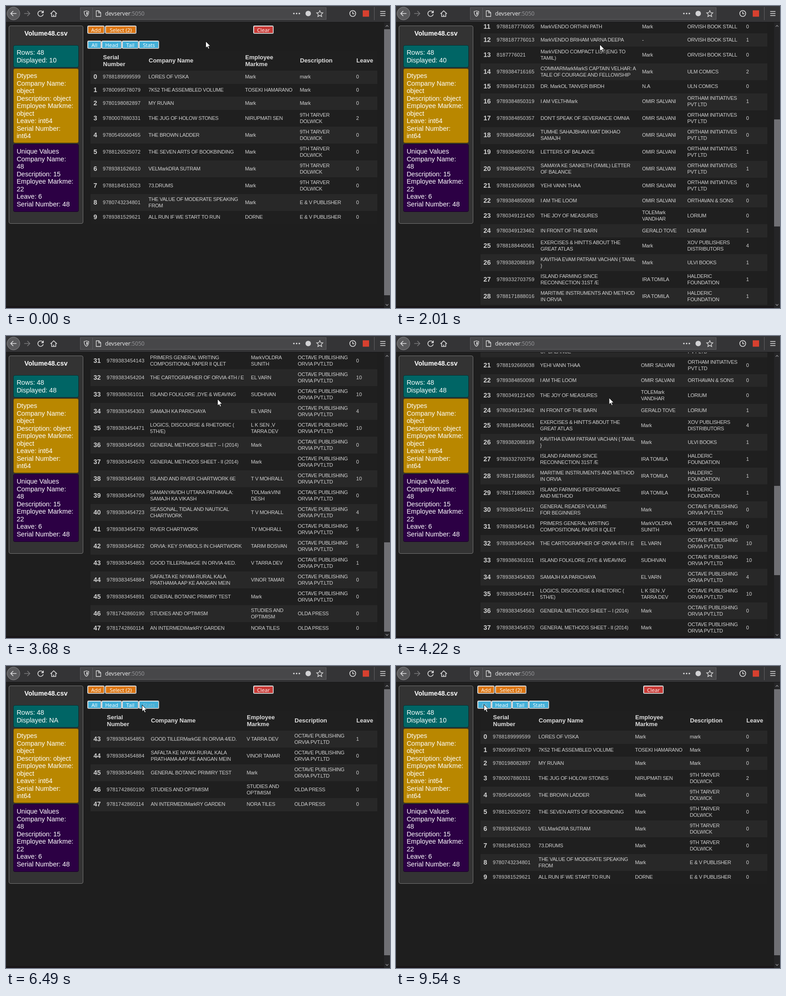
Write an HTML page that moves like this. It is 845 px wide and 663 px high and loops after 9.59 s.

```html
<!DOCTYPE html>
<html lang="en">
<head>
<meta charset="utf-8">
<title>Table viewer</title>
<style>
html, body { margin: 0; width: 100%; height: 100%; overflow: hidden; background: #1e1e1e; }
body { position: relative; color: #d2d2d2; font-family: "Liberation Sans", Arial, sans-serif; }
div, svg, button { position: absolute; box-sizing: border-box; }
#page { left: 0; top: 36px; width: 832px; height: 623px; overflow: hidden; }
#scroll { left: 0; top: -36px; width: 832px; height: 2000px; }
#foot { left: 0; top: 659px; width: 845px; height: 4px; background: #191518; }
.row { left: 186px; width: 631px; background: #1f1f1f; }
.row.even { background: #282828; }
.cell { top: 0; bottom: 0; display: flex; align-items: center; white-space: pre;
  font-size: 11.2px; line-height: 13.7px; letter-spacing: -.3px; }
.cell.num { letter-spacing: .16px; }
.cell.key { font-size: 14.4px; font-weight: bold; letter-spacing: 0; }
.cell.head { font-size: 13px; line-height: 14.4px; font-weight: bold; letter-spacing: 0; color: #dedede; }
button { margin: 0; padding: 0; height: 18px; border: 2px solid; border-radius: 3px;
  border-color: #e2e2e2 #c4c4c4 #c4c4c4 #e2e2e2; color: #fff; text-align: center;
  font: 11.6px/13px "Open Sans", "Noto Sans", sans-serif; white-space: nowrap; }
.dim { color: #8fbfd2; }
#caret { left: 286px; top: 44px; width: 1px; height: 15px; background: #ddd; }
#side { left: 6px; top: 43px; width: 164px; height: 435px; background: #333; border: 1px solid #777; border-radius: 4px; }
#name { left: 0; right: 0; top: 8px; text-align: center; font: bold 14.4px/17px "Liberation Sans", Arial, sans-serif; color: #fff; }
.box { left: 9px; width: 144px; padding: 7px 0 0 6.4px; border-radius: 4px; border: 1px solid #0007;
  color: #fff; font-size: 14.5px; line-height: 16.5px; white-space: pre; }
#bar { left: 832px; top: 36px; width: 13px; height: 627px; background: #252527; }
#thumb { left: 0; width: 13px; background: #707074; }
#url { left: 218px; top: 8px; font: 12.2px/18px "Open Sans", "Noto Sans", sans-serif; color: #f2f2f3; }
#url span { color: #99999c; }
</style>
</head>
<body>
<div id="page"><div id="scroll"><div id="caret"></div></div></div>
<div id="foot"></div>
<div id="side"><div id="name">Volume48.csv</div></div>
<div id="bar">
  <svg width="13" height="627" fill="none" stroke="#8c8c90" stroke-width="1.3"><path d="M3.5 9.5l3-3 3 3M3.5 618.5l3 3 3-3"/></svg>
  <div id="thumb"></div>
</div>
<svg width="845" height="36" fill="none" stroke="#dededf" stroke-width="1.6">
  <g stroke="none">
    <path fill="#343436" d="M0 0h845v36H0z"/>
    <path fill="#161618" d="M0 35h845v1H0z"/>
  </g>
  <rect x="163.500" y="3.500" width="541" height="26" fill="#474749" stroke="#626265" stroke-width="1"/>
  <circle cx="16.500" cy="16.500" r="14" fill="#5a5a5c" stroke="#8c8c8e" stroke-width="1"/>
  <path d="M23 16.500H10.500M16 11l-5.500 5.500L16 22"/>
  <path stroke="#77777a" d="M40 16.500h12.500M47 11l5.500 5.500L47 22"/>
  <path d="M81 13.200A6 6 0 1 0 82 18"/>
  <path fill="#dededf" stroke="none" d="M83 9.500v6h-6z"/>
  <path d="M98 17.200l7-6.700 7 6.700M100.500 16v7h9v-7M105 23v-4"/>
  <path stroke-width="1.300" d="M177 10.500c2 1 3.500 1.300 5 1.400 0 6-1.500 9-5 10.800-3.500-1.800-5-4.800-5-10.800 1.500-.1 3-.4 5-1.400z"/>
  <path fill="#dededf" stroke="none" d="M177 13c1 .5 2 .8 3 .9 0 3-1 5-3 6.400z"/>
  <path stroke="#626265" stroke-width="1" d="M190.500 4v25M810.500 2v29"/>
  <path stroke-width="1.300" d="M198.500 10.500h6l4 4v8.500h-10zM204 10.500v4.500h4.500"/>
  <g fill="#d2d2d4" stroke="none">
    <circle cx="633.500" cy="16.500" r="1.700"/><circle cx="639.500" cy="16.500" r="1.700"/><circle cx="645.500" cy="16.500" r="1.700"/>
    <circle cx="665" cy="16.500" r="6"/>
    <path fill="#d8402f" d="M785 9.500h14v14h-14z"/>
  </g>
  <path stroke-width="1.300" d="M690.500 10l2 4.500 4.900.5-3.600 3.300 1 4.800-4.300-2.500-4.300 2.500 1-4.800-3.600-3.300 4.900-.5z"/>
  <circle cx="763" cy="16.500" r="6.500"/>
  <path d="M763 12.500v4.500h3.500M823.500 12h11.500M823.500 16.500h11.500M823.500 21h11.500"/>
</svg>
<div id="url">devserver<span>:5050</span></div>
<svg id="cursor" width="13" height="20" style="left:0;top:0"><path d="M.5.5v14.500l3.400-3 2.300 5.200 2.400-1-2.300-5.100h4.500z" fill="#fff" stroke="#111"/></svg>
<script>
const LOOP = 9590;
const $ = id => document.getElementById(id);

// serial; title; employee; description (blank repeats the one above); leave
// Break marks: | always, ~ + ^ depend on the column widths of the view
const rows = `9788189999599;LORES OF VISKA;Mark;mark;0
9780099578079;7K52 THE ASSEMBLED VOLUME;TOSEKI^HAMARANO;Mark;0
9780198082897;MY RUVAN;Mark;Mark;0
9780007880331;THE JUG OF HOLOW STONES;NIRUPMATI+SEN;9TH TARVER|DOLWICK;2
9780545060455;THE BROWN LADDER;Mark;;0
9788126525072;THE SEVEN ARTS OF BOOKBINDING;Mark;;0
9789381626610;VELMarkDRA SUTRAM;Mark;;0
9788184513523;73.DRUMS;Mark;;0
9780743234801;THE VALUE OF MODERATE SPEAKING~FROM;Mark;E & V PUBLISHER;0
9789381529621;ALL RUN IF WE START TO RUN;DORNE;;0
9788183223966;BELNAR SE TOVAR TAK (QRD);Mark;;0
9788187776005;MarkVENDO ORTHIN PATH;Mark;ORVISH BOOK+STALL;0
9788187776013;MarkVENDO BRIHAM VARNA DEEPA;-;;1
8187776021;MarkVENDO COMPACT LIST(ENG TO~TAMIL);Mark;;0
9789384716165;COMMARMarkMarkS CAPTAIN VELHAR: A|TALE OF COURAGE AND FELLOWSHIP;Mark;ULM COMICS;2
9789384716233;DR. MarkOL TANVER BIRDH;N.A;ULN COMICS;0
9789384850319;I AM VELTHMark;OMIR SALVANI;ORTHAM+INITIATIVES~PVT+LTD;1
9789384850357;DON'T SPEAK OF SEVERANCE OMNIA;OMIR SALVANI;;0
9789384850364;TUMHE SAHAJBHAVI MAT DIKHAO~SAMAJH;OMIR SALVANI;;0
9789384850746;LETTERS OF BALANCE;OMIR SALVANI;;1
9789384850753;SAMAYA KE SANKETH (TAMIL) LETTER|OF BALANCE;OMIR SALVANI;;1
9788192669038;YEHI VANN THAA;OMIR SALVANI;;0
9789384850098;I AM THE LOOM;OMIR SALVANI;ORTHAVAN & SONS;0
9780349121420;THE JOY OF MEASURES;TOLEMark|VANDHAR;LORIUM;0
9780349123462;IN FRONT OF THE BARN;GERALD TOVE;;1
9788188440061;EXERCISES & HINTTS ABOUT THE|GREAT ATLAS;Mark;XOV PUBLISHERS|DISTRIBUTORS;4
9789382088189;KAVITHA EVAM PATRAM VACHAN { TAMIL|};Mark;ULVI BOOKS;1
9789332703759;ISLAND FARMING SINCE|RECONNECTION 31ST /E;IRA TOMILA;HALDERIC|FOUNDATION;1
9788171888016;MARITIME INSTRUMENTS AND METHOD|IN ORVIA;IRA TOMILA;;1
9788171888023;ISLAND FARMING PERFORMANCE|AND METHOD;IRA TOMILA;;1
9789383454112;GENERAL READER VOLUME|FOR BEGINNERS;Mark;OCTAVE PUBLISHING|ORVIA PVT.LTD;0
9789383454143;PRIMERS GENERAL WRITING|COMPOSITIONAL PAPER II QLET;MarkVOLDRA|SUNITH;;0
9789383454204;THE CARTOGRAPHER OF ORVIA 4TH / E;EL VARN;;10
9789386361011;ISLAND FOLKLORE ,DYE & WEAVING;SUDHIVAN;;10
9789383454303;SAMAJH KA PARICHAYA;EL VARN;;4
9789383454471;LOGICS, DISCOURSE & RHETORIC (|5TH/E);L K SEN ,V|TARRA DEV;;10
9789383454563;GENERAL METHODS SHEET -- I (2014);Mark;;0
9789383454570;GENERAL METHODS SHEET - II (2014);Mark;;0
9789383454693;ISLAND AND RIVER CHARTWORK 6E;T V MOHRALL;;10
9789383454709;SAMANYAVIDH UTTARA PATHMALA:|SAMAJH KA VIKASH;TOLMarkVINI|DESH;;0
9789383454723;SEASONAL, TIDAL AND NAUTICAL|CHARTWORK;T V MOHRALL;;4
9789383454730;RIVER CHARTWORK;TV MOHRALL;;5
9789383454822;ORVIA: KEY SYMBOLS IN CHARTWORK;TARIM BOSVAN;;5
9789383454853;GOOD TILLERMarkGE IN ORVIA 4/ED.;V TARRA DEV;;1
9789383454884;SAFALTA KE NIYAM-RURAL KALA|PRATHAMA AAP KE AANGAN MEIN;VINOR TAMAR;;0
9789383454891;GENERAL BOTANIC PRIMIRY TEST;Mark;;0
9781742860190;STUDIES AND OPTIMISM;STUDIES AND|OPTIMISM;OLDA PRESS;0
9781742860114;AN INTERMEDIMarkRY GARDEN;NORA TILES;;0`.split('\n').map((line, i) => [i, ...line.split(';')]);
rows.forEach((r, i) => { r[4] = r[4] || rows[i - 1][4]; });

const stats = `count;48;48
mean;9574862471318;1.58
std;1152906841533;2.93
min;8187776021;0
25%;9788171888016;0
50%;9789383454124;0
75%;9789384716182;1
max;9789386361011;10`.split('\n').map(line => line.split(';'));

const heads = ['', 'Serial|Number', 'Company Name', 'Employee|Markme', 'Description', 'Leave'];
const narrow = [193, 213.5, 314, 526.5, 647, 771];
const mid = [193, 222, 318.5, 542, 641.5, 771];
const views = {
  ten: { xs: narrow, data: rows.slice(0, 10), marks: '|~', max: 14, label: '10' },
  twenty: { xs: [193, 222, 318.5, 552, 649, 771], data: rows.slice(0, 20), marks: '|+^', max: 227, label: '20' },
  thirty: { xs: mid, data: rows.slice(0, 30), marks: '|~^', max: 484, label: '30' },
  forty: { xs: mid, data: rows.slice(0, 40), marks: '|~^', max: 889, label: '40' },
  full: { xs: [193, 222, 317.5, 539.5, 642.5, 771], data: rows, marks: '|~^', max: 1178, label: '48' },
  head: { xs: narrow, data: rows.slice(0, 5), marks: '|~', max: 14, label: 'NA' },
  tail: { xs: [193, 222, 319, 530, 635, 771], data: rows.slice(43), marks: '|~^', max: 14, label: 'NA' },
  stats: { xs: [193, 320, 620], data: stats, heads: ['', 'Serial Number', 'Leave'], marks: '|', max: 14, label: 'NA' }
};

function add(parent, cls, text = '', css = {}, tag = 'div') {
  const el = document.createElement(tag);
  el.className = cls;
  el.textContent = text;
  Object.assign(el.style, css);
  return parent.appendChild(el);
}
const px = n => n + 'px';

function addRow(parent, cells, view, y, h, cls) {
  const row = add(parent, cls, '', { top: px(y), height: px(h) });
  cells.forEach((text, i) => {
    const isHead = cls === 'row';
    const kind = isHead ? 'head' : i === 0 ? 'key' : /^[\d.]+$/.test(text) ? 'num' : '';
    add(row, 'cell ' + kind, text, { left: px(view.xs[i] - 186.4 + (isHead ? .4 : 0)) });
  });
}

function build(view) {
  const el = add($('scroll'), 'view');
  const wrap = cells => cells.map(c => String(c).replace(/[|~+^]/g, m => view.marks.includes(m) ? '\n' : ' '));
  const lines = cells => Math.max(...cells.map(c => c.split('\n').length));
  const title = wrap(view.heads || heads);
  let y = 99, h = lines(title) > 1 ? 43 : 28.5;
  addRow(el, title, view, y, h, 'row');
  view.data.forEach((r, i) => {
    y += h;
    const cells = wrap(r);
    h = [28.67, 37, 50.6][lines(cells) - 1];
    addRow(el, cells, view, y, h, i % 2 ? 'row odd' : 'row even');
  });
  view.el = el;
}
Object.values(views).forEach(build);

const buttons = {};
[['Add', 179, 38, 43, '#dc7612'], ['Select (2)', 218, 69, 43, '#dc7612'], ['Clear', 544, 45, 43, '#c93a36'],
 ['All', 179, 31, 76, '#42b0d9'], ['Head', 210, 45, 76, '#42b0d9'], ['Tail', 255, 37, 76, '#42b0d9'],
 ['Stats', 292, 45, 76, '#42b0d9']].forEach(([text, x, w, y, bg]) => {
  buttons[text] = add($('scroll'), '', text, { left: px(x), top: px(y), width: px(w), background: bg }, 'button');
});
$('scroll').append($('caret'));

const addBox = (y, h, bg, text) => add($('side'), 'box', text, { top: px(y), height: px(h), background: bg });
const info = addBox(42, 49, '#006565', '');
addBox(93, 164, '#b98700', 'Dtypes\nCompany Name:\nobject\nDescription: object\nEmployee Markme:\nobject\nLeave: int64\nSerial Number:\nint64');
addBox(259, 149, '#2c0044', 'Unique Values\nCompany Name:\n48\nDescription: 15\nEmployee Markme:\n22\nLeave: 6\nSerial Number: 48');

const shown = [[0, 'ten'], [560, 'twenty'], [1060, 'thirty'], [1600, 'forty'], [2310, 'full'],
  [5450, 'head'], [6320, 'tail'], [6590, 'stats'], [7960, 'ten']];
const scrolls = [[400, 0], [520, 14], [560, 14], [940, 227], [1220, 227], [1590, 484], [2020, 484], [2300, 889],
  [2550, 889], [2900, 1178], [3980, 1178], [4632, 0]];
const moves = [[400, 439, 77], [900, 446, 83], [1220, 446, 83], [1600, 448, 84], [2550, 448, 84], [2930, 455, 121],
  [3260, 455, 121], [3680, 465, 138], [3810, 468, 141], [3980, 468, 141], [4500, 469, 128], [4650, 469, 128],
  [5300, 232, 85], [5500, 232, 85], [5870, 268, 84], [6320, 268, 84], [6480, 299, 85], [6600, 299, 85],
  [6840, 308, 85], [7090, 308, 85], [7740, 192, 83], [8670, 192, 83], [8700, 193, 84]];
const dims = [['Head', 5280, 5600], ['Tail', 6180, 6420], ['Stats', 6460, 7160], ['All', 7700, LOOP]];
const caretOff = [[5980, 6180], [7090, 7620], [8490, 9010], [9540, LOOP]];

// Eased value of one column of a keyed table
function at(keys, t, col = 1) {
  const i = keys.findIndex(k => k[0] > t);
  if (i === 0) return keys[0][col];
  if (i < 0) return keys[keys.length - 1][col];
  const a = keys[i - 1], b = keys[i], p = (t - a[0]) / (b[0] - a[0]);
  return a[col] + (b[col] - a[col]) * p * p * (3 - 2 * p);
}

let current;
function draw(t) {
  const view = views[shown.filter(s => s[0] <= t).pop()[1]];
  if (view !== current) {
    Object.values(views).forEach(v => { v.el.style.display = v === view ? 'block' : 'none'; });
    info.textContent = 'Rows: 48\nDisplayed: ' + view.label;
    current = view;
  }
  const y = Math.min(at(scrolls, t), view.max);
  const size = 598 * 575 / (575 + view.max);
  $('scroll').style.transform = `translateY(${-y}px)`;
  $('thumb').style.height = px(size);
  $('thumb').style.top = px(15 + (598 - size) * y / view.max);
  $('cursor').style.transform = `translate(${at(moves, t)}px, ${at(moves, t, 2)}px)`;
  $('caret').style.opacity = caretOff.some(([a, b]) => t >= a && t < b) ? 0 : 1;
  dims.forEach(([name, a, b]) => buttons[name].classList.toggle('dim', t >= a && t < b));
}

const start = performance.now();
function tick() {
  draw((performance.now() - start) % LOOP);
  requestAnimationFrame(tick);
}
tick();
</script>
</body>
</html>
```
